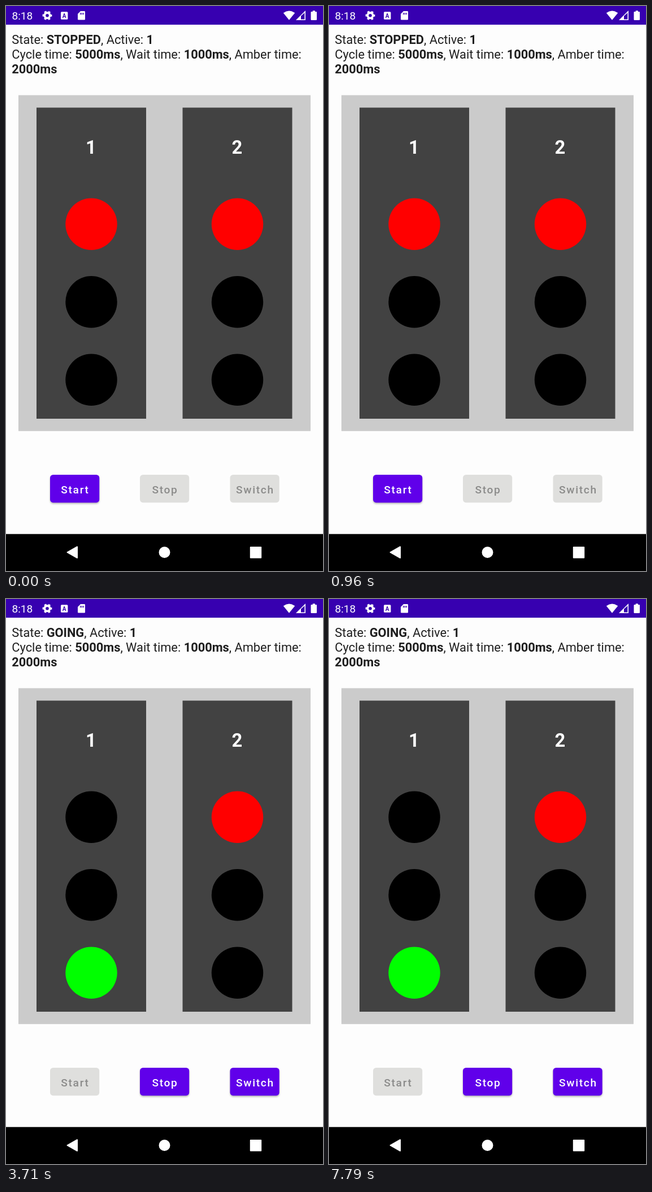
Write an HTML page that moves like this. It is 561 by 998 pixels and loops after 8000 ms.

```html
<!DOCTYPE html>
<html lang="en">
<head>
<meta charset="utf-8">
<title>Traffic lights</title>
<style>
  html, body { margin: 0; width: 100%; height: 100%; overflow: hidden; background: #fdfdfd; }
  svg { display: block; width: 561px; height: 998px; font-family: Roboto, sans-serif; }
  .info { font-size: 21.82px; fill: #1e1e1e; }
  .num { font-size: 32.7px; font-weight: 700; fill: #fff; text-anchor: middle; }
  .b { font-weight: 700; }
  .btn rect { fill: #6000ea; filter: drop-shadow(0 2px 1.5px rgba(0, 0, 0, .28)); }
  .btn text { font-size: 19.1px; font-weight: 500; letter-spacing: 1.7px; text-anchor: middle; fill: #fff; }
  .btn.off rect { fill: #dfdfdd; filter: none; }
  .btn.off text { fill: #8b8b8a; }
</style>
</head>
<body>
<svg viewBox="0 0 561 998">
  <rect width="561" height="33" fill="#3700b0"/>
  <g fill="#fff">
    <text x="10.5" y="23.7" font-size="19.1">8:18</text>
    <g fill="none" stroke="#fff">
      <circle cx="73" cy="16.7" r="4.7" stroke-width="3.8"/>
      <circle cx="73" cy="16.7" r="7.1" stroke-width="2.6" stroke-dasharray="3.8 3.635" stroke-dashoffset="1.9"/>
    </g>
    <rect x="97" y="10.3" width="12.4" height="13.4" rx="1.5"/>
    <text x="103.2" y="20.6" font-size="10" class="b" text-anchor="middle" fill="#3700b0">A</text>
    <path d="M132 9H138.6Q140 9 140 10.4V23.2Q140 24.6 138.6 24.6H128.4Q127 24.6 127 23.2V14Z"/>
    <path d="M131.7 12v3.2M134.4 12v3.2M137.1 12v3.2" stroke="#3700b0" stroke-width="1.4"/>
    <path d="M490.8 12.2Q501 4.8 511.2 12.2L501 24.8Z"/>
    <path d="M513 25L530 8V25Z M522 17.8V23.4H528.4V11.9Z" fill-rule="evenodd"/>
    <path d="M542.7 8.3H546.9V10H548.8Q550 10 550 11.2V23.8Q550 25 548.8 25H540.7Q539.5 25 539.5 23.8V11.2Q539.5 10 540.7 10H542.7Z"/>
  </g>

  <text class="info" x="10.3" y="67">State: <tspan class="b" id="state">STOPPED</tspan>, Active: <tspan class="b">1</tspan></text>
  <text class="info" x="10.3" y="93">Cycle time: <tspan class="b">5000ms</tspan>, Wait time: <tspan class="b">1000ms</tspan>, Amber time:</text>
  <text class="info b" x="10.3" y="118.6">2000ms</text>

  <rect x="22" y="157.5" width="517" height="593.3" fill="#cbcbcb"/>
  <g id="lights"></g>
  <g id="buttons"></g>

  <rect y="932.7" width="561" height="65.3"/>
  <g fill="#fff" stroke="#fff" stroke-width="2" stroke-linejoin="round">
    <path d="M108.5 965L126 955.2V974.8Z"/>
    <circle cx="280.5" cy="965" r="9"/>
    <rect x="432.8" y="956" width="18.4" height="18.4"/>
  </g>
</svg>
<script>
  const LOOP = 8000, START = 3080;
  const $ = id => document.getElementById(id);

  $('lights').innerHTML = [151, 409.5].map((x, i) => `
    <rect x="${x - 97}" y="179.5" width="194" height="549.5" fill="#424242"/>
    <text class="num" x="${x - .5}" y="261.3">${i + 1}</text>` +
    [385.3, 522.8, 660.3].map(y => `<circle cx="${x}" cy="${y}" r="45.7"/>`).join('')
  ).join('');

  $('buttons').innerHTML = [['Start', 121.6], ['Stop', 280.6], ['Switch', 440.1]].map(([label, x]) => `
    <g class="btn">
      <rect x="${x - 43.6}" y="828" width="87.2" height="49.2" rx="5.4"/>
      <text x="${x + .85}" y="860.5">${label}</text>
    </g>`).join('');

  const lamps = document.querySelectorAll('#lights circle');
  const buttons = document.querySelectorAll('.btn');
  lamps[3].setAttribute('fill', '#f00');

  let shown;
  function show(going) {
    if (going === shown) return;
    shown = going;
    $('state').textContent = going ? 'GOING' : 'STOPPED';
    lamps[0].setAttribute('fill', going ? '#000' : '#f00');
    lamps[2].setAttribute('fill', going ? '#0f0' : '#000');
    buttons.forEach((b, i) => b.classList.toggle('off', (i === 0) === going));
  }

  const origin = performance.now();
  function frame() {
    show((performance.now() - origin) % LOOP >= START);
    requestAnimationFrame(frame);
  }
  frame();
</script>
</body>
</html>
```
